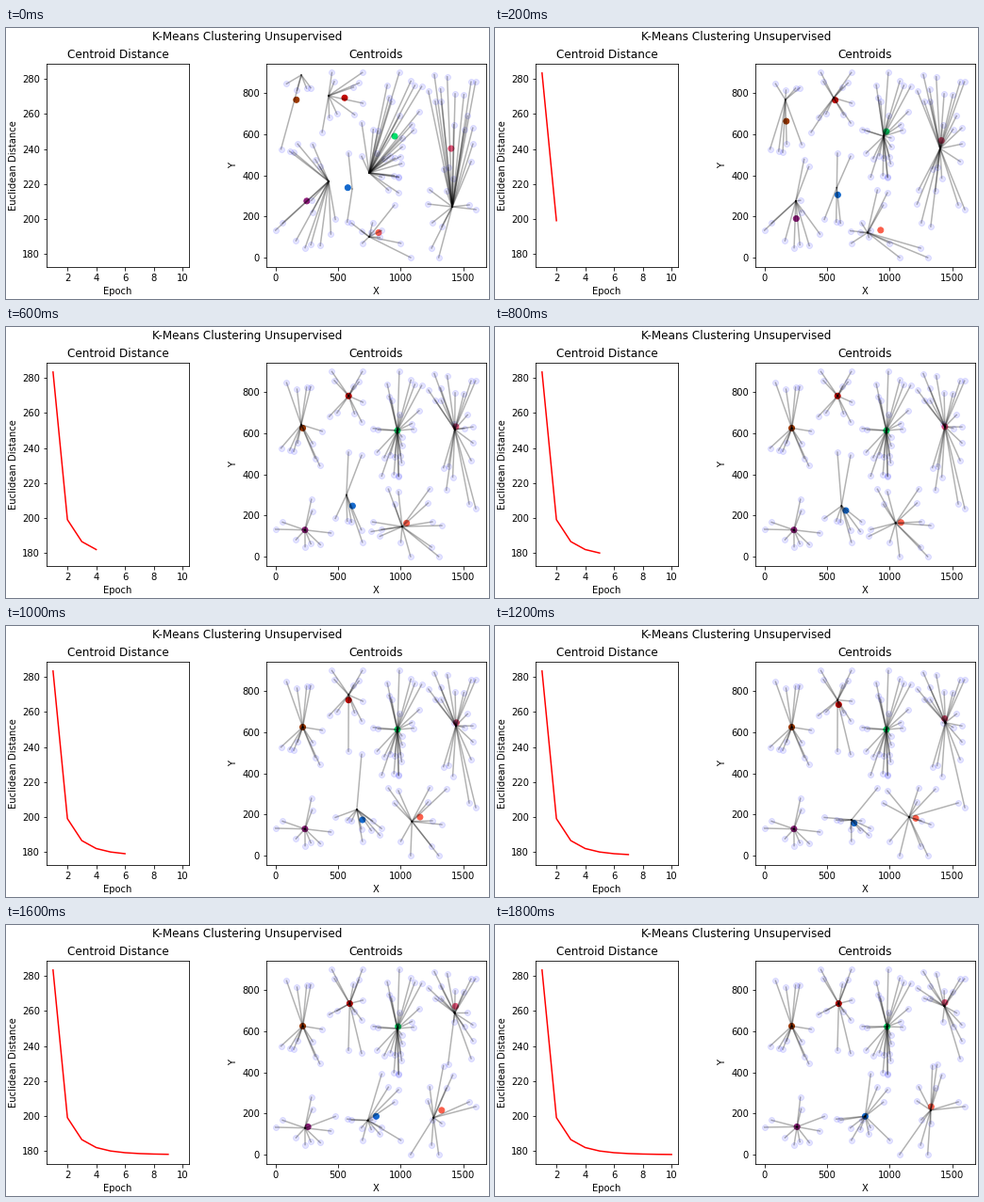
Write a matplotlib script that moves like this. It is 512x288 px and loops after 2000 ms.

```python
import matplotlib.pyplot as plt
import numpy as np
from matplotlib.animation import FuncAnimation
from matplotlib.collections import LineCollection

W, H, DPI = 512, 288, 72
EPOCHS = 10
FIELD = (1600, 900)

COLORS = ["#9a3600", "#c00800", "#00e06a", "#e6557a", "#8c1e78", "#1469cd", "#fa5f4b"]
STARTS = [(206, 888), (424, 787), (748, 412), (1412, 247), (424, 371), (613, 334),
          (748, 101)]

# Each anchor is the middle of a pair of samples
ANCHORS = [
    (130, 830), (265, 825), (95, 520), (145, 535), (335, 580), (335, 460),
    (460, 885), (680, 875), (660, 790), (460, 690), (660, 675), (635, 500),
    (1035, 880), (900, 810), (1140, 835), (960, 725), (800, 620), (840, 495),
    (1125, 665), (1050, 615), (1005, 515), (935, 490),
    (1245, 850), (1345, 850), (1300, 760), (1470, 795), (1580, 855), (1465, 635),
    (1555, 660), (1570, 510), (1360, 435), (1390, 355), (1575, 245),
    (25, 150), (290, 250), (200, 65), (320, 60),
    (460, 150), (590, 170), (770, 145), (840, 115), (690, 100),
    (995, 425), (965, 395), (875, 360), (965, 285), (1225, 295), (1290, 160),
    (1040, 35), (1275, 20),
]


def scatter_pairs(anchors, seed=4):
    rng = np.random.default_rng(seed)
    middle = np.array(anchors, float)
    angle = rng.uniform(0, 2 * np.pi, len(middle))
    radius = rng.uniform(15, 55, len(middle))
    offset = radius[:, None] * np.column_stack([np.cos(angle), np.sin(angle)])
    return np.clip(np.vstack([middle + offset, middle - offset]), 0, FIELD)


def nearest(points, centers):
    gaps = np.linalg.norm(points[:, None] - centers[None], axis=2)
    return gaps.argmin(axis=1)


def k_means(points, centers, epochs):
    history = [np.array(centers, float)]
    for _ in range(epochs):
        old = history[-1]
        owner = nearest(points, old)
        history.append(np.array([points[owner == k].mean(axis=0) if k in owner else c
                                 for k, c in enumerate(old)]))
    return history


def distance(epoch):
    return 177.8 + 105.7 * np.exp(-1.606 * (epoch - 1) ** 0.64)


def add_axes(left, right, title, xlabel, ylabel):
    ax = fig.add_axes([left / W, 34 / H, (right - left) / W, 216 / H])
    ax.set_title(title)
    ax.set_xlabel(xlabel)
    ax.set_ylabel(ylabel)
    return ax


points = scatter_pairs(ANCHORS)
history = k_means(points, STARTS, EPOCHS)

fig = plt.figure(figsize=(W / DPI, H / DPI), dpi=DPI)
fig.suptitle("K-Means Clustering Unsupervised", y=1 - 3 / H, va="top")

ax_dist = add_axes(43, 194, "Centroid Distance", "Epoch", "Euclidean Distance")
ax_dist.set_xlim(0.55, 10.45)
ax_dist.set_ylim(172.5, 288.8)
ax_dist.set_xticks(range(2, 11, 2))
ax_dist.set_yticks(range(180, 281, 20))
curve, = ax_dist.plot([], [], color="red")

ax_map = add_axes(276, 509, "Centroids", "X", "Y")
ax_map.set_xlim(-73, 1683)
ax_map.set_ylim(-46, 943)
ax_map.set_xticks(range(0, 1501, 500))
ax_map.set_yticks(range(0, 801, 200))
dots = ax_map.scatter(*history[1].T, c=COLORS)
ax_map.scatter(*points.T, color="blue", alpha=0.1)
links = LineCollection([], colors="black", alpha=0.3, linewidths=1.5,
                       capstyle="projecting", zorder=2)
ax_map.add_collection(links, autolim=False)


def update(step):
    centers = history[step]
    links.set_segments(np.stack([centers[nearest(points, centers)], points], axis=1))
    dots.set_offsets(history[step + 1])
    epochs = np.arange(1, step + 2)
    curve.set_data(epochs, distance(epochs))
    return links, dots, curve


anim = FuncAnimation(fig, update, frames=EPOCHS, interval=200, repeat=True)
plt.show()
```
